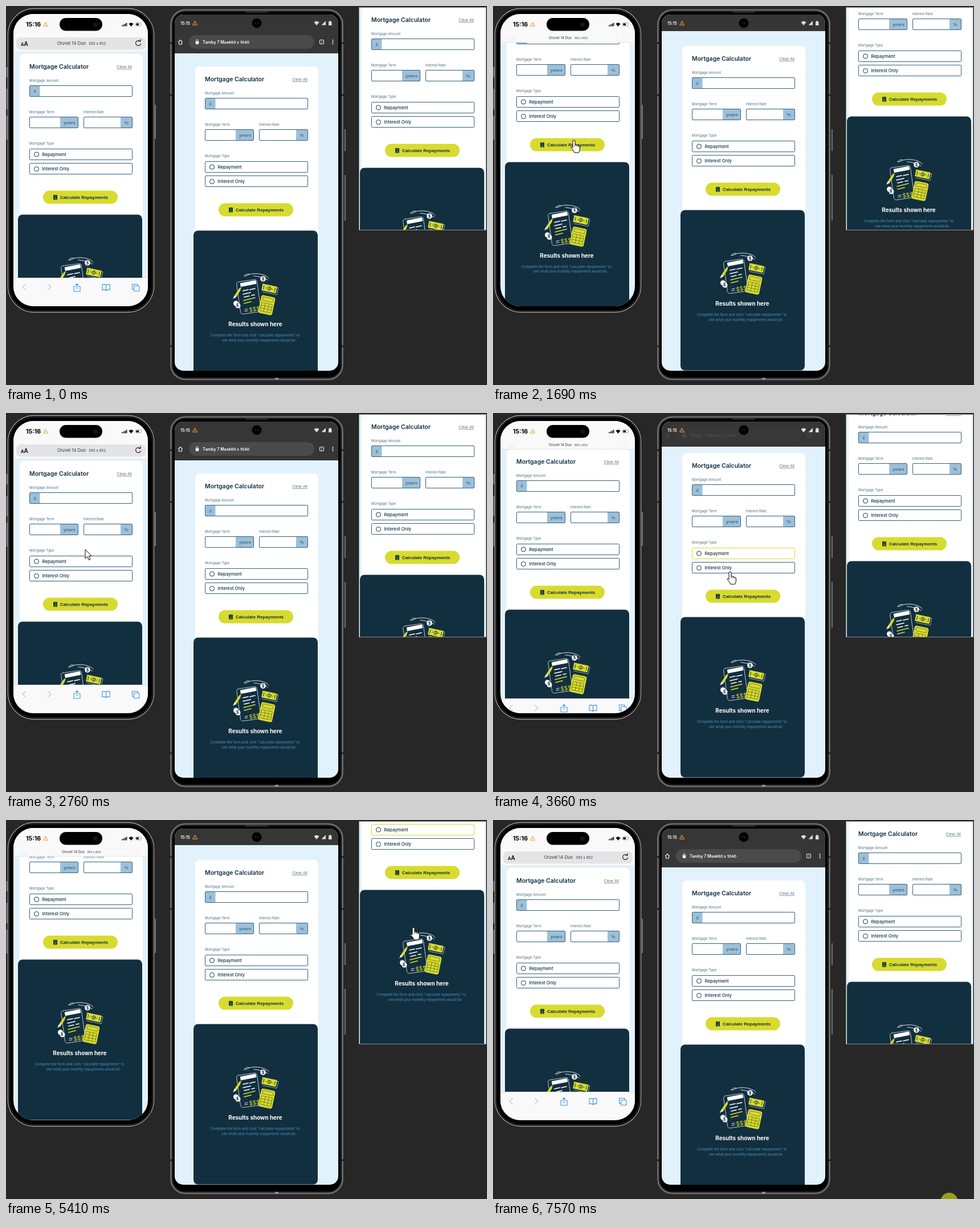
Animation of 844 by 664 pixels, one loop 7.68 s. Source, as an HTML page:

```html
<!DOCTYPE html>
<html lang="en">
<head>
<meta charset="utf-8">
<title>Mortgage calculator on three screens</title>
<style>
/* --r: shared scroll distance that drives pages and toolbars */
@property --r { syntax: '<number>'; inherits: true; initial-value: 0; }

html, body { margin: 0; width: 100%; height: 100%; overflow: hidden; background: #272728; }
svg.stage { display: block; width: 100%; height: 100%; animation: scroll 7680ms linear infinite; }
text { font-family: Inter, "Open Sans", sans-serif; white-space: pre; }
.arial { font-family: "Liberation Sans", Arial, sans-serif; font-weight: 700; }

@keyframes scroll {
  0% { --r: 0; }
  17.7% { --r: 0; animation-timing-function: steps(6); }
  22% { --r: 90; animation-timing-function: steps(4); }
  24.86% { --r: 174; }
  32.16% { --r: 174; animation-timing-function: steps(5); }
  35.67% { --r: 0; }
  42.57% { --r: 0; animation-timing-function: steps(7); }
  47.65% { --r: 24; }
  52.66% { --r: 24; animation-timing-function: steps(3); }
  55.2% { --r: 0; }
  59.89% { --r: 0; animation-timing-function: steps(5); }
  63.15% { --r: 174; }
  69.72% { --r: 174; animation-timing-function: steps(1); }
  70.44% { --r: 161; animation-timing-function: steps(4); }
  73.3% { --r: 0; }
  100% { --r: 0; }
}

.p1 { transform: translateY(calc(-1px * max(0, min(121, var(--r) * 71 / 66 - 4.818)))); }
.p2 { transform: translate(308px, calc(22px - 1px * min(36, var(--r) * 1.5))); }
.p3 { transform: translate(600px, calc(-82px - 1px * var(--r))); }
.p2 .card { transform: translateY(6px); }

.shrink { --k: min(1, var(--r) / 24); }
.head { transform: translateY(calc(-17px * var(--k))); }
.name { transform: translateY(calc(-9px * var(--k))) scale(calc(1 - .2 * var(--k))); transform-origin: 131px 65px; }
.addr { transform: translateY(calc(-9px * var(--k))); opacity: calc(1 - .97 * var(--k)); }
.foot { transform: translateY(calc(1px * min(60, var(--r)))); }
.bar { transform: translateY(calc(-1px * min(39, var(--r)))); }
.tools { opacity: max(0, 1 - var(--r) / 27); }

.p1 .pick { animation: hover1 7680ms step-end infinite; }
.p2 .pick { animation: hover2 7680ms step-end infinite; }
.p3 .pick { animation: hover3 7680ms step-end infinite; }
@keyframes hover1 { 27.6% { stroke: #d8db2f; } 28.5%, 100% { stroke: #34617a; } }
@keyframes hover2 { 42% { stroke: #d8db2f; } 56.5%, 100% { stroke: #34617a; } }
@keyframes hover3 { 59.89% { stroke: #d8db2f; } 78.5%, 100% { stroke: #34617a; } }

.cursor { animation: move 7680ms linear infinite; fill: #fff; stroke: #000; stroke-linejoin: round; }
@keyframes move {
  0% { transform: translate(818px, 700px); }
  2.01% { transform: translate(818px, 700px); animation-timing-function: steps(9); }
  8.33% { transform: translate(430px, 290px); animation-timing-function: steps(4); }
  11.06% { transform: translate(320px, 225px); animation-timing-function: steps(2); }
  12.5% { transform: translate(266px, 256px); animation-timing-function: steps(3); }
  14.71% { transform: translate(171px, 196px); }
  17.64% { transform: translate(171px, 196px); animation-timing-function: steps(1); }
  18.35% { transform: translate(142px, 235px); }
  26.88% { transform: translate(142px, 235px); animation-timing-function: steps(1); }
  27.6% { transform: translate(142px, 143px); animation-timing-function: steps(1); }
  28.51% { transform: translate(139px, 239px); }
  36.06% { transform: translate(139px, 239px); animation-timing-function: steps(9); }
  42.57% { transform: translate(416px, 278px); }
  55.14% { transform: translate(416px, 278px); animation-timing-function: steps(1); }
  55.85% { transform: translate(429px, 275px); animation-timing-function: steps(6); }
  59.89% { transform: translate(715px, 188px); }
  77.79% { transform: translate(715px, 188px); animation-timing-function: steps(14); }
  88.28% { transform: translate(757px, 548px); }
  88.47% { transform: translate(757px, 548px); animation-timing-function: steps(9); }
  94.92%, 100% { transform: translate(792px, 672px); }
}
.hand { animation: hand 7680ms step-end infinite; }
.arrow { animation: arrow 7680ms step-end infinite; }
@keyframes hand {
  0% { opacity: 0; } 20.8% { opacity: 1; } 28.5% { opacity: 0; } 41.5% { opacity: 1; }
  56.5% { opacity: 0; } 59.8% { opacity: 1; } 78.5%, 100% { opacity: 0; }
}
@keyframes arrow {
  0% { opacity: 1; } 20.8% { opacity: 0; } 28.5% { opacity: 1; } 41.5% { opacity: 0; }
  56.5% { opacity: 1; } 59.8% { opacity: 0; } 78.5%, 100% { opacity: 1; }
}
.press { animation: press 7680ms step-end infinite; }
@keyframes press { 0% { opacity: 0; } 98.56%, 100% { opacity: 1; } }

.title { font-size: 10.5px; font-weight: 600; fill: #12303f; }
.label { font-size: 6px; fill: #4e6e7e; }
.opt { font-size: 7.8px; font-weight: 500; fill: #12303f; }
.unit { font-size: 8px; fill: #4e6e80; text-anchor: middle; }
.box { fill: none; stroke: #34617a; }
.tint { fill: #9cc0da; }
.note { font-size: 6.1px; fill: #4e93c0; text-anchor: middle; }
</style>
</head>
<body>
<svg class="stage" viewBox="0 0 844 664">
  <defs>
    <clipPath id="s1"><rect x="13" y="14" width="236" height="512" rx="35"/></clipPath>
    <clipPath id="s2"><rect x="296" y="15" width="287" height="624" rx="15"/></clipPath>
    <clipPath id="s3"><rect x="620" y="3" width="222" height="389"/></clipPath>

    <g id="page">
      <rect x="24" y="84" width="216" height="300" rx="8" fill="#fff"/>
      <text class="title" x="41" y="110">Mortgage Calculator</text>
      <text x="221" y="109" font-size="6.7" fill="#4e6e80" text-anchor="end" text-decoration="underline">Clear All</text>

      <text class="label" x="41" y="133">Mortgage Amount</text>
      <rect class="tint" x="42" y="140" width="17.500" height="18"/>
      <text class="arial unit" x="51" y="151.500">£</text>
      <rect class="box" x="41.500" y="139.500" width="180" height="19" rx="1.500"/>

      <text class="label" x="41" y="188">Mortgage Term</text>
      <text class="label" x="136" y="188">Interest Rate</text>
      <rect class="tint" x="95" y="195" width="31" height="18"/>
      <rect class="tint" x="201" y="195" width="20" height="18"/>
      <text class="arial unit" x="111.500" y="207">years</text>
      <text class="arial unit" x="211" y="207">%</text>
      <rect class="box" x="41.500" y="194.500" width="85" height="19" rx="1.500"/>
      <rect class="box" x="136.500" y="194.500" width="85" height="19" rx="1.500"/>

      <text class="label" x="41" y="243">Mortgage Type</text>
      <rect class="box pick" x="41.500" y="250.500" width="180" height="19" rx="1"/>
      <rect class="box" x="41.500" y="275.500" width="180" height="19" rx="1"/>
      <g fill="none" stroke="#12303f"><circle cx="53.500" cy="260" r="4"/><circle cx="53.500" cy="285.500" r="4"/></g>
      <text class="opt" x="63.500" y="262.800">Repayment</text>
      <text class="opt" x="63.500" y="288.300">Interest Only</text>

      <rect x="65" y="323.500" width="131" height="23" rx="11.500" fill="#d8db2f"/>
      <rect x="83" y="331" width="7" height="8.500" rx="1" fill="#12303f"/>
      <path d="M84.500 333h4M84.500 336h4M84.500 338h4" stroke="#d8db2f" stroke-width=".8" stroke-dasharray="1 .5"/>
      <text class="arial" x="95" y="337.800" font-size="7.900" fill="#12303f">Calculate Repayments</text>

      <g class="card">
        <rect x="21" y="365.500" width="218" height="281" rx="8" fill="#122f3f"/>
        <g transform="translate(0 121)" stroke-linecap="round">
          <g fill="none" stroke="#fff" stroke-width=".9">
            <path d="M110 324q4-5 9-3q-4 3-9 3M119 321q15-3 27 2q5 2 7 5M127 324q13 1 24 7" stroke-dasharray="3 .8"/>
            <rect x="100" y="332" width="36" height="57" rx="4" transform="rotate(-8 118 361)" stroke-dasharray="1.500 1.500"/>
            <path d="M142 338l28 7-3 12-25-5" stroke-dasharray="1.500 1.500" stroke-width=".7"/>
          </g>
          <rect x="103" y="334" width="28" height="6.500" rx="1" fill="#fff" transform="rotate(-11 117 337)"/>
          <g fill="none" stroke="#fff" stroke-width="1.700">
            <path d="M108 350l9-2M120 348l9-2M108 356l13-3M110 361l9-2M123 358l5-1"/>
            <path d="M111 383l5-1M111 386l5-1" stroke-width=".9"/>
            <path d="M109 367l20-5M110 372l12-3" stroke="#d8db2f"/>
          </g>
          <path d="M101 346l4-3-2 7-7 11-4 1 1-4z" fill="#d8db2f"/>
          <path d="M93 358l3 3-6 3z" fill="#fff"/>
          <text transform="translate(119 387) rotate(-8)" font-size="10" fill="#d8db2f">$$$</text>
          <g transform="rotate(12 154 346)">
            <rect x="141" y="340" width="26" height="12" rx="1.500" fill="#d8db2f"/>
            <g fill="none" stroke="#122f3f" stroke-width=".9"><circle cx="154" cy="346" r="3"/><path d="M144 343v6M164 343v6M148 346h1M159 346h1M154 344v4"/></g>
          </g>
          <g transform="rotate(12 149 375)">
            <rect x="137" y="359" width="25" height="32" rx="4" fill="#d8db2f"/>
            <g fill="none" stroke="#6f7629" stroke-width=".8"><rect x="140" y="362" width="19" height="6" rx="1"/><path d="M140 372h19v15h-19zM140 377h19M140 382h19M146.500 372v15M153 372v15"/></g>
          </g>
          <g fill="#fff"><circle cx="143" cy="329" r="4.800"/><circle cx="95.500" cy="372" r="4.500"/><circle cx="99" cy="376" r="4.500"/></g>
          <g class="arial" font-size="7" fill="#122f3f" text-anchor="middle"><text x="143" y="331.500">$</text><text x="98" y="377.500">$</text></g>
        </g>
        <text x="129.500" y="532.800" font-size="9.900" font-weight="700" fill="#fff" text-anchor="middle">Results shown here</text>
        <text class="note" x="129" y="551.200">Complete the form and click "calculate repayments" to</text>
        <text class="note" x="136" y="559.500">see what your monthly repayments would be.</text>
      </g>
    </g>

    <g id="warn"><path d="M0-3.800L4 3.300H-4Z" fill="none" stroke="#f0a030" stroke-linejoin="round"/><path d="M0-1.300V1M0 1.800v.7" stroke="#f0a030" stroke-width=".9"/></g>
    <g id="wifi"><path d="M-4.500-1.500Q0-5.500 4.500-1.500L0 4Z"/></g>
  </defs>

  <rect width="844" height="664" fill="#272728"/>

  <!-- left phone -->
  <path d="M1.500 107v18M1.500 145v36M1.500 192v42M262 173v60" stroke="#77777a" stroke-width="2"/>
  <rect x="3.500" y="4.500" width="256" height="532" rx="46" fill="#000" stroke="#a2a2a4" stroke-width="1.300"/>
  <rect x="6" y="7" width="251" height="527" rx="43.500" fill="none" stroke="#3c3c3e"/>
  <g clip-path="url(#s1)">
    <rect x="13" y="14" width="236" height="512" fill="#e2f2fc"/>
    <g class="page p1"></g>
    <g class="shrink">
      <path class="head" d="M13-10H249V80.500H13Z" fill="#f9f9f9" stroke="#e3e3e5"/>
      <g class="addr">
        <rect x="18" y="55" width="227" height="21.500" rx="7" fill="#e4e4e6"/>
        <text x="26" y="70" font-size="7.500" font-weight="600">A<tspan font-size="10">A</tspan></text>
        <path d="M235.500 62a4.500 4.500 0 1 0 1 4M232 62h4V58" fill="none" stroke="#111" stroke-width="1.100"/>
      </g>
      <g class="name" fill="#333"><text x="140" y="67.800" font-size="7.600" text-anchor="end">Oruvel 14 Duo</text><text x="145" y="67.800" font-size="6.300">393 x 852</text></g>
    </g>
    <text x="35" y="35.800" font-size="10.600" font-weight="700">15:16</text>
    <use href="#warn" x="69.500" y="32"/>
    <rect x="94" y="21" width="75" height="22.500" rx="11.200"/>
    <circle cx="157" cy="32.500" r="4.500" fill="#101016"/><circle cx="157" cy="32.500" r="1.500" fill="#1e1e2c"/>
    <path d="M204 35.500v-2M206.500 35.500v-3M209 35.500v-4.500M211.500 35.500v-6" stroke="#111" stroke-width="1.700"/>
    <use href="#wifi" x="219.500" y="32.500" transform="translate(21.950 3.250) scale(.9)" fill="#111"/>
    <rect x="227.500" y="29.500" width="10" height="5.500" rx="1.700" fill="none" stroke="#999" stroke-width=".9"/>
    <rect x="228.500" y="30.500" width="4.500" height="3.500" rx=".8"/>
    <g class="foot" fill="none" stroke="#3f94dc" stroke-width="1.100">
      <path d="M12 476.500H250V600H12Z" fill="#f9f9fa" stroke="#dcdcdf"/>
      <path d="M34.500 487.500l-5.500 5 5.500 5M73.500 487.500l5.500 5-5.500 5" stroke="#c4c4c8"/>
      <path d="M122 491.500h-3v8.500h11v-8.500h-3M124.500 496v-9M121.800 489.500l2.700-2.700 2.700 2.700"/>
      <path d="M175.500 489q-3-2-6.500-1v9.500q3.500-1 6.500 1 3-2 6.500-1v-9.500q-3.500-1-6.500 1v9.500"/>
      <path d="M224 496.500h-2.500v-9h9.500v2.500"/><rect x="224.500" y="490.500" width="9.500" height="9" rx="1"/>
    </g>
  </g>

  <!-- middle phone -->
  <path d="M595 216v38M595 296v80" stroke="#6c6c6e" stroke-width="2.200"/>
  <rect x="289.500" y="7" width="301" height="647" rx="25" fill="#000" stroke="#69696b" stroke-width="3"/>
  <rect x="292.500" y="10" width="295" height="641" rx="22" fill="none" stroke="#2c2c2d"/>
  <path d="M288 65h3M288 156h3M288 596h3M589 65h3M589 156h3M589 596h3" stroke="#222" stroke-width="3"/>
  <rect x="420" y="9.500" width="40" height="2" rx="1" fill="#3b3b3c"/>
  <path d="M472 653h6" stroke="#a5a5a5" stroke-width="2.500"/>
  <g clip-path="url(#s2)">
    <rect x="296" y="15" width="287" height="624" fill="#e2f2fc"/>
    <g class="page p2"></g>
    <g class="bar">
      <rect x="296" y="-40" width="287" height="123" fill="#363636"/>
      <g class="tools">
        <rect x="321" y="51" width="220" height="24" rx="12" fill="#4a4a4b"/>
        <path d="M302.500 63l3.500-3.500 3.500 3.500M303.500 63v4h5v-4" fill="none" stroke="#fff" stroke-width="1.100"/>
        <path d="M333.800 62v-1.500a1.700 1.700 0 0 1 3.400 0V62" fill="none" stroke="#fff" stroke-width=".9"/>
        <rect x="332.800" y="61.700" width="5.400" height="5" rx=".6" fill="#fff"/>
        <text x="345" y="66" font-size="7.200" font-weight="600" fill="#fff">Tamby 7 Max<tspan x="390" font-size="6.800">480 x 1040</tspan></text>
        <rect x="550.500" y="59.500" width="7" height="7" rx="1.500" fill="none" stroke="#fff"/>
        <path d="M554 61.500v3" stroke="#fff" stroke-width=".9"/>
        <g fill="#fff"><circle cx="573.500" cy="60" r="1"/><circle cx="573.500" cy="63" r="1"/><circle cx="573.500" cy="66" r="1"/></g>
      </g>
    </g>
    <text x="306" y="32.600" font-size="7.100" font-weight="600" fill="#fff">15:15</text>
    <use href="#warn" x="331.500" y="30"/>
    <g fill="#ddd"><use href="#wifi" x="545" y="30"/><path d="M553.500 33.500h7.500V26ZM566 27.500h1.500v-1.500h2.500v1.500h1.500v6.500h-5.500Z"/></g>
    <circle cx="440" cy="30" r="8.500"/>
    <g fill="#38383a"><circle cx="438" cy="30" r="1"/><circle cx="442" cy="30" r="1"/></g>
  </g>

  <!-- right panel -->
  <rect x="619.500" y="2.500" width="223" height="390" fill="#e2f2fc" stroke="#8d8d8f"/>
  <g clip-path="url(#s3)"><g class="page p3"></g></g>

  <circle class="press" cx="800.500" cy="668" r="15" fill="#9c9d1b"/>
  <g class="cursor">
    <path class="arrow" d="M0 0V16L3.700 12.500 6.300 18.500 8.800 17.400 6.300 11.600H11.300Z"/>
    <g class="hand">
      <path d="M-2 2Q-2 0 0 0T2 2V8q1.500-1 3 .8q1.600-.7 2.800 1q2.600-.4 2.600 2.200v4q0 3-2 6h-7.500q-1-3-4-6.500q-2.500-2.500-1.900-3q1-1.300 3 .8z"/>
      <path d="M2 8v3.500M5 9v2.800M7.800 10v2" fill="none" stroke-width=".8"/>
    </g>
  </g>
</svg>
<script>
const page = document.getElementById('page');
for (const slot of document.querySelectorAll('.page')) {
  for (const part of page.children) slot.append(part.cloneNode(true));
}
</script>
</body>
</html>
```
